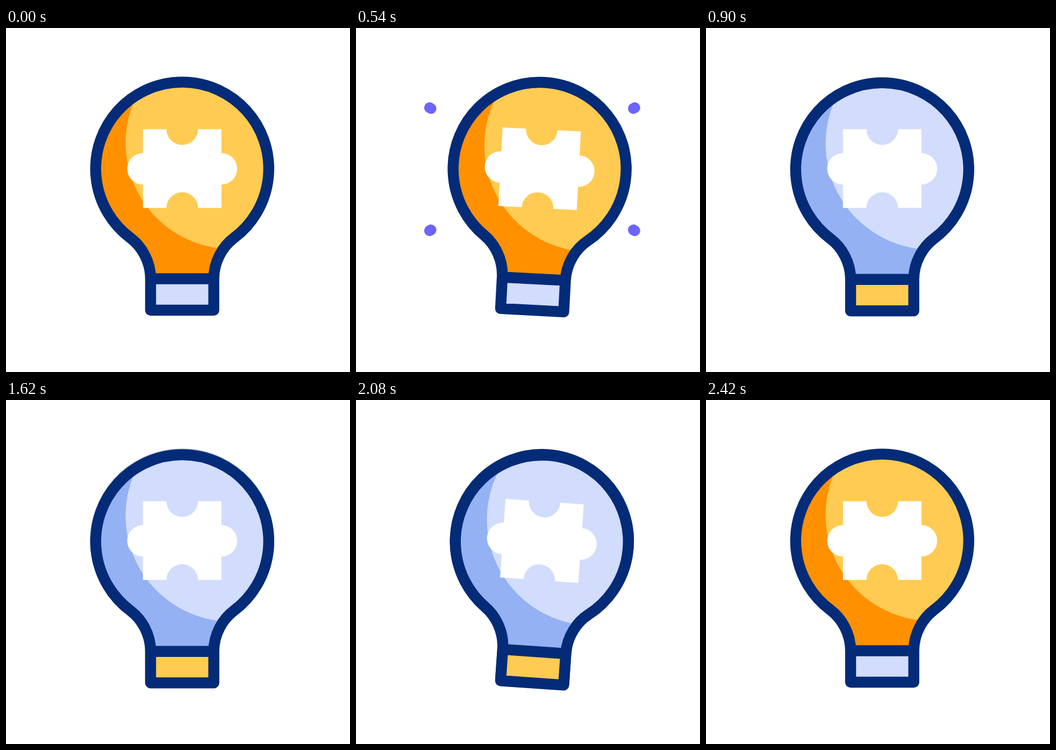
These frames come from a looping animation (640x640 px, 2620 ms). An HTML page:

```html
<!DOCTYPE html>
<html lang="en">
<head>
<meta charset="utf-8">
<title>Idea bulb</title>
<style>
  html, body { margin: 0; width: 100%; height: 100%; overflow: hidden; background: #fff; }
  svg { display: block; width: 100%; height: 100%; }
</style>
</head>
<body>
<svg id="stage" viewBox="0 0 640 640"></svg>
<script>
const LOOP = 2620;
const CX = 327.8, CY = 262.7;
const PIVOT = "327.8 524";
const NAVY = "#032b77", YELLOW = "#ffcb52", ORANGE = "#ff9100";
const LAVENDER = "#d2dcfd", BLUE = "#94b1f3", VIOLET = "#6c64ff";
const WOBBLES = [195, 1765];

const glass = "M269 466.5C269 434 252 406 232 391A161 161 0 1 1 423.6 391" +
  "C403.6 406 386.6 434 386.6 466.5Z";
const piece = "M254.8 188.3H298.5A29.3 29.3 0 0 0 357.1 188.3H400.8V232.7" +
  "A29.3 29.3 0 0 1 400.8 291.3V334.7H357.1A29.3 29.3 0 0 0 298.5 334.7" +
  "H254.8V291.3A29.3 29.3 0 0 1 254.8 232.7Z";

const bulb = (id, shade, light, base, dy) => `
  <g id="${id}"><g transform="translate(0 ${dy})">
    <path d="${glass}" fill="${shade}"/>
    <circle cx="419.5" cy="214" r="197" fill="${light}" clip-path="url(#glass)"/>
    <path d="M269 466.5H386.6V525H269Z" fill="${base}"/>
    <path d="${glass}M269 466.5V525H386.6V466.5" fill="none" stroke="${NAVY}"
      stroke-width="20.4" stroke-linejoin="round"/>
  </g></g>`;

const stage = document.getElementById("stage");
stage.innerHTML = `
  <defs><clipPath id="glass"><path d="${glass}"/></clipPath></defs>
  <g id="lamp">
    ${bulb("warm", ORANGE, YELLOW, LAVENDER, 0)}
    ${bulb("cool", BLUE, LAVENDER, YELLOW, 1.3)}
    <path d="${piece}" fill="#fff"/>
  </g>
  <path id="sparks" fill="none" stroke="${VIOLET}" stroke-width="20" stroke-linecap="round"/>`;

const [lamp, warm, cool, sparks] =
  ["lamp", "warm", "cool", "sparks"].map(id => document.getElementById(id));

const ramp = (t, from, to) => Math.min(1, Math.max(0, (t - from) / (to - from)));

// Swing right to 4°, back to -2°, then settle.
const swing = t => 4 * ramp(t, 0, 320) - 6 * ramp(t, 320, 480) + 2 * ramp(t, 480, 640);

function sparkPath(from, to) {
  if (to <= from) return "";
  const point = (sx, sy, k) => `${CX + sx * (188.3 + 32 * k)} ${CY + sy * (112.9 + 19.2 * k)}`;
  return [[-1, -1], [1, -1], [1, 1], [-1, 1]]
    .map(([sx, sy]) => `M${point(sx, sy, from)}L${point(sx, sy, to)}`).join("");
}

function draw(t) {
  const [first, second] = WOBBLES;
  const angle = swing(t - first) + swing(t - second);
  const coolIn = ramp(t, first + 380, first + 500);
  const coolOut = ramp(t, second + 380, second + 500);
  const warmAlpha = coolIn < 1 ? 1 : ramp(t, 1605, 1640);

  lamp.setAttribute("transform", `rotate(${angle} ${PIVOT})`);
  warm.setAttribute("opacity", warmAlpha);
  cool.setAttribute("opacity", coolIn - coolOut);
  sparks.setAttribute("d", sparkPath(ramp(t, 650, 890), ramp(t, 515, 835)));
}

const start = performance.now();
function tick() {
  draw((performance.now() - start) % LOOP);
  requestAnimationFrame(tick);
}
tick();
</script>
</body>
</html>
```
